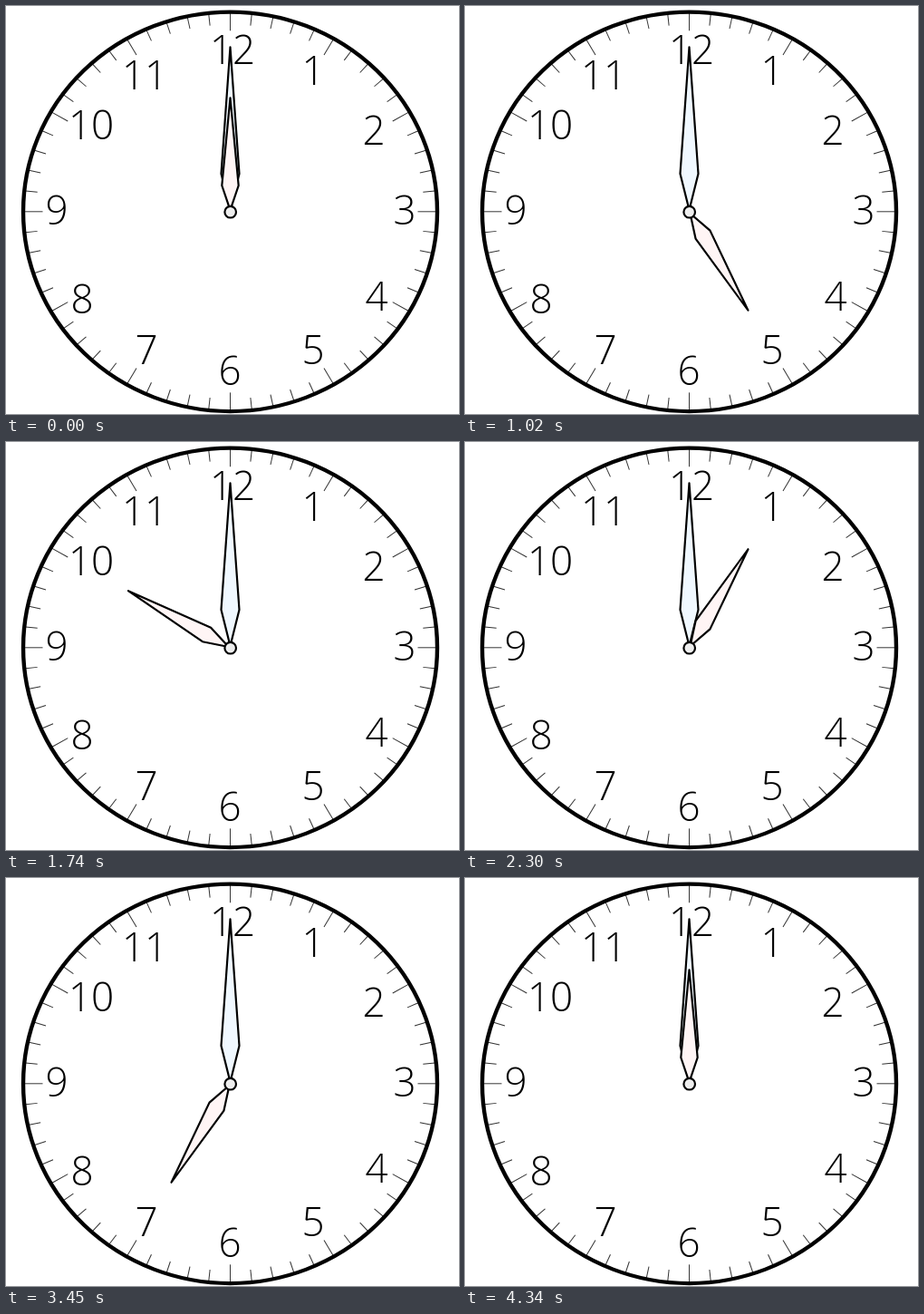
An HTML page for the animation above (4.4 s loop, 500 by 450 pixels).

```html
<!DOCTYPE html>
<html lang="en">
<head>
<meta charset="utf-8">
<title>Clock</title>
<style>
html, body { margin: 0; width: 100%; height: 100%; overflow: hidden; background: #fff; }
svg { display: block; width: 100vw; height: 100vh; }
text { font: 350 44px "Open Sans", "Noto Sans", sans-serif; text-anchor: middle; fill: #000; }
.hand { stroke: #000; stroke-width: 2.2; stroke-linejoin: round; }
</style>
</head>
<body>
<svg viewBox="0 0 500 450">
  <g transform="translate(247.5 226.8) scale(1 .964)">
    <g id="ticks" stroke="#333"></g>
    <circle r="228.5" fill="none" stroke="#000" stroke-width="4.4"/>
  </g>
  <g id="numbers"></g>
  <g transform="translate(247.5 227) scale(1 .966)">
    <path class="hand" fill="#f0f8ff" d="M0-188L10-43.5L0-2L-10-43.5Z"/>
    <path class="hand" id="hour" fill="#fff5f5" d="M0-130L9.2-30L0-2L-9.2-30Z"/>
  </g>
  <circle cx="247.7" cy="227.2" r="6.3" fill="#eee" stroke="#000" stroke-width="2.2"/>
</svg>
<script>
const LOOP = 4400;
// Each entry is the moment the hour hand jumps one hour ahead.
const jumps = [
  360, 390, 690, 720, 1020, 1050, 1250, 1380, 1640, 1740, 2040, 2100,
  2300, 2630, 2690, 2990, 3020, 3220, 3450, 3650, 3780, 4110, 4140, 4340
];
// Centres of the numerals 1 to 12.
const centres = [
  [339, 71], [406, 137], [440, 225], [409, 320], [339, 379], [247, 402],
  [155, 379], [84, 323], [56, 225], [94, 131], [153, 76], [250, 48]
];

function add(parent, name, attrs, text = "") {
  const el = document.createElementNS("http://www.w3.org/2000/svg", name);
  for (const key in attrs) el.setAttribute(key, attrs[key]);
  el.textContent = text;
  document.getElementById(parent).append(el);
}

for (let i = 0; i < 60; i++) {
  const major = i % 5 === 0;
  add("ticks", "line", {
    y1: -227, y2: major ? -207 : -214,
    "stroke-width": 1, transform: `rotate(${i * 6})`
  });
}
centres.forEach(([x, y], i) => add("numbers", "text", { x, y: y + 15.7 }, i + 1));

const hour = document.getElementById("hour");
const start = performance.now();

function draw(now) {
  const t = Math.max(0, now - start) % LOOP;
  const hours = jumps.filter(jump => jump <= t).length;
  hour.setAttribute("transform", `rotate(${hours * 30})`);
  requestAnimationFrame(draw);
}
draw(start);
</script>
</body>
</html>
```
